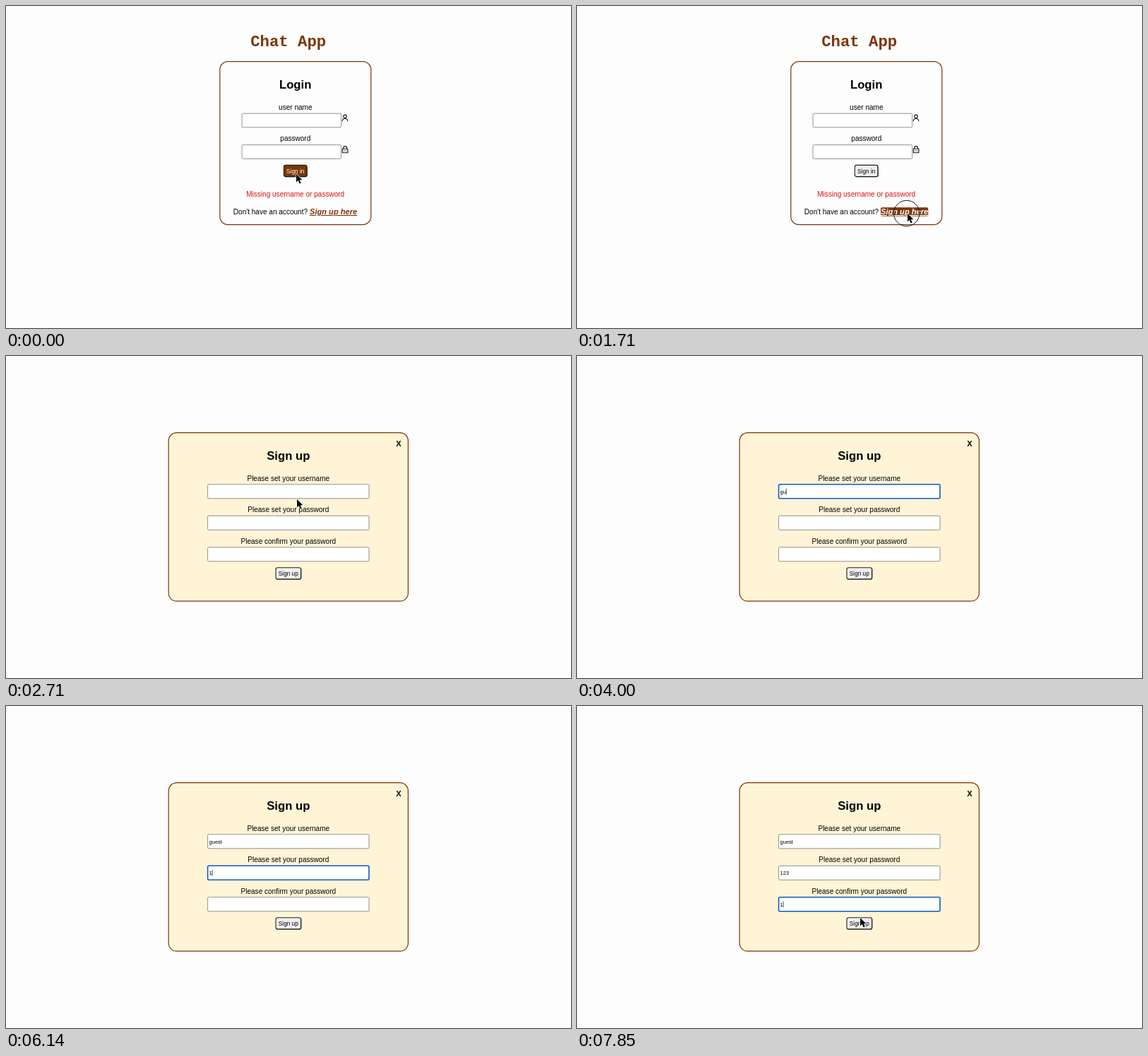
Animation, 800 px wide and 456 px high, one loop 8000 ms. Source, as an HTML page:

```html
<!DOCTYPE html>
<html lang="en">
<head>
<meta charset="utf-8">
<title>Chat App</title>
<style>
  html, body { margin: 0; width: 100%; height: 100%; overflow: hidden; background: #fdfdfd; }
  svg { display: block; width: 800px; height: 456px; }
  text { font-family: "Liberation Sans", Arial, sans-serif; white-space: pre; }
  .title { font-family: "Liberation Mono", "Courier New", monospace; }
</style>
</head>
<body>
<svg id="stage" viewBox="0 0 800 456"></svg>
<script>
const stage = document.getElementById('stage');
const pen = document.createElement('canvas').getContext('2d');
pen.font = '7.5px "Liberation Sans", Arial, sans-serif';

const BROWN = '#7b3608';
const FRAMES = 56, LOOP = 8000;

// Pointer paths: [step, x, y]; the pointer is hidden between paths.
const paths = [
  [[0, 411, 238], [1, 402, 252], [3, 362, 298], [4, 351, 311], [5, 364, 317], [8, 439, 293],
   [9, 458, 295], [10, 468, 294], [13, 468, 294], [15, 455, 272], [19, 412, 203], [22, 398, 192], [26, 398, 192]],
  [[37, 398, 192], [38, 396, 198], [40, 384, 234], [42, 382, 237]],
  [[46, 380, 240], [48, 366, 274], [50, 362, 279]],
  [[53, 362, 282], [54, 384, 294], [55, 401, 300]]
];
const clicks = [12, 23, 41, 49];

// Sign-up fields: label, top, step of focus, step of first key, final text
const fields = [
  ['Please set your username', 181.8, 24, 27, 'guest'],
  ['Please set your password', 226.3, 42, 43, '123'],
  ['Please confirm your password', 270.8, 50, 51, '1']
];

const text = (s, x, y, size, extra = '') =>
  `<text x="${x}" y="${y}" font-size="${size}" ${extra}>${s}</text>`;
const mid = (s, x, y, size, extra = '') => text(s, x, y, size, 'text-anchor="middle" ' + extra);
const box = (x, y, w, h, r, fill, stroke, sw = 1) =>
  `<rect x="${x}" y="${y}" width="${w}" height="${h}" rx="${r}" fill="${fill}" stroke="${stroke}" stroke-width="${sw}"/>`;

function button(label, x, y, w, hover) {
  return box(x, y, w, 16.2, 2.5, hover ? BROWN : '#efefef', hover ? '#33190a' : '#222', 1.1) +
    `<path d="M${x + 1} ${y + 16.3}h${w - 2}q1.2 0 1.2-1.6V${y + 2}" fill="none" stroke="#111" stroke-width=".8"/>` +
    mid(label, x + w / 2, y + 11.1, 8.25, `fill="${hover ? '#fff' : '#000'}"`);
}

function login(pointer) {
  const over = (x, y, w, h) => pointer && pointer[0] >= x && pointer[0] <= x + w &&
    pointer[1] >= y && pointer[1] <= y + h;
  const link = over(430, 284, 67, 14);
  return mid('Chat App', 399.7, 57, 22.3, `class="title" font-weight="bold" fill="${BROWN}"`) +
    box(302.8, 78.6, 214, 231, 11.5, 'none', BROWN, 1.2) +
    mid('Login', 409.7, 117, 16.7, 'font-weight="bold"') +
    mid('user name', 409.8, 146.6, 10.05) +
    box(334, 152.2, 140.6, 19.6, 1.5, '#fff', '#767676', .8) +
    mid('password', 409.8, 191.2, 10.05) +
    box(334, 196.7, 140.6, 19.6, 1.5, '#fff', '#767676', .8) +
    `<g fill="none" stroke="#111" stroke-width="1.1">
      <circle cx="480" cy="156.3" r="2.2"/><path d="M476.2 163.2c0-5 7.6-5 7.6 0"/>
      <path d="M476.3 202.2h7.6v5.6h-7.6zM477.7 202v-1c0-3.2 4.8-3.2 4.8 0v1"/>
      <path d="M478 205h4.4" stroke-dasharray=".9 .8"/></g>` +
    button('Sign in', 393.4, 225.4, 32.6, over(393, 225, 33, 17)) +
    mid('Missing username or password', 409.7, 269.7, 10.05, 'fill="#d9120b"') +
    text("Don't have an account?", 321.8, 295, 10.05) +
    (link ? box(430, 285.2, 67.2, 12.6, 2, BROWN, 'none') : '') +
    text('Sign up here', 430, 295, 11.1,
      `font-weight="bold" font-style="italic" text-decoration="underline" fill="${link ? '#fff' : BROWN}"`);
}

function field([label, top, focus, first, full], i, step) {
  const next = fields[i + 1];
  const active = step >= focus && !(next && step >= next[2]);
  const typed = full.slice(0, Math.max(0, step - first + 1));
  const caret = 287.9 + pen.measureText(typed).width;
  return mid(label, 399.8, top - 5.1, 10.05) +
    box(285.6, top, 228.4, 20, 1.5, '#fff', active ? '#0b5cc4' : '#767676', active ? 1.6 : .8) +
    text(typed, 287.6, top + 12.7, 7.5) +
    (active ? `<path d="M${caret} ${top + 5.8}v8.6" stroke="#000" stroke-width=".7"/>` : '');
}

function signUp(step) {
  return box(230.2, 108.6, 339.2, 238.6, 11.5, '#fff4d6', BROWN, 1.2) +
    mid('X', 556, 128, 11.1, 'font-weight="bold"') +
    mid('Sign up', 399.8, 147, 16.7, 'font-weight="bold"') +
    fields.map((f, i) => field(f, i, step)).join('') +
    button('Sign up', 382, 299.8, 35.6, false);
}

function pointerAt(step) {
  const path = paths.find(p => step >= p[0][0] && step <= p[p.length - 1][0]);
  if (!path) return null;
  const i = Math.max(1, path.findIndex(p => p[0] >= step));
  const [a, ax, ay] = path[i - 1], [b, bx, by] = path[i];
  const u = (step - a) / (b - a);
  return [ax + (bx - ax) * u, ay + (by - ay) * u];
}

function drawPointer([x, y], step) {
  const inField = step > 12 && x > 285 && x < 514 && fields.some(f => y > f[1] && y < f[1] + 20);
  const shape = inField
    ? '<path d="M-2-5.5q2 0 2 1.5v8q0 1.5-2 1.5M2-5.5q-2 0-2 1.5v8q0 1.5 2 1.5" fill="none" stroke="#222" stroke-width=".9"/>'
    : '<path d="M0 0V11.6L2.7 9.1 4.6 13.6 6.7 12.7 4.8 8.3H8.4Z" stroke="#fff" stroke-width="1.3" stroke-linejoin="round" paint-order="stroke"/>';
  const ring = clicks.includes(step)
    ? '<circle cx="-1.3" cy="-.4" r="18.2" fill="none" stroke="#111" stroke-width="1"/>' : '';
  return `<g transform="translate(${x} ${y})">${ring}${shape}</g>`;
}

let shown = -1;
function tick(now) {
  const step = Math.floor((now % LOOP + 9) * FRAMES / LOOP) % FRAMES;
  if (step !== shown) {
    shown = step;
    const pointer = pointerAt(step);
    stage.innerHTML = (step < 13 ? login(pointer) : signUp(step)) +
      (pointer ? drawPointer(pointer, step) : '');
  }
  requestAnimationFrame(tick);
}
tick(0);
</script>
</body>
</html>
```
